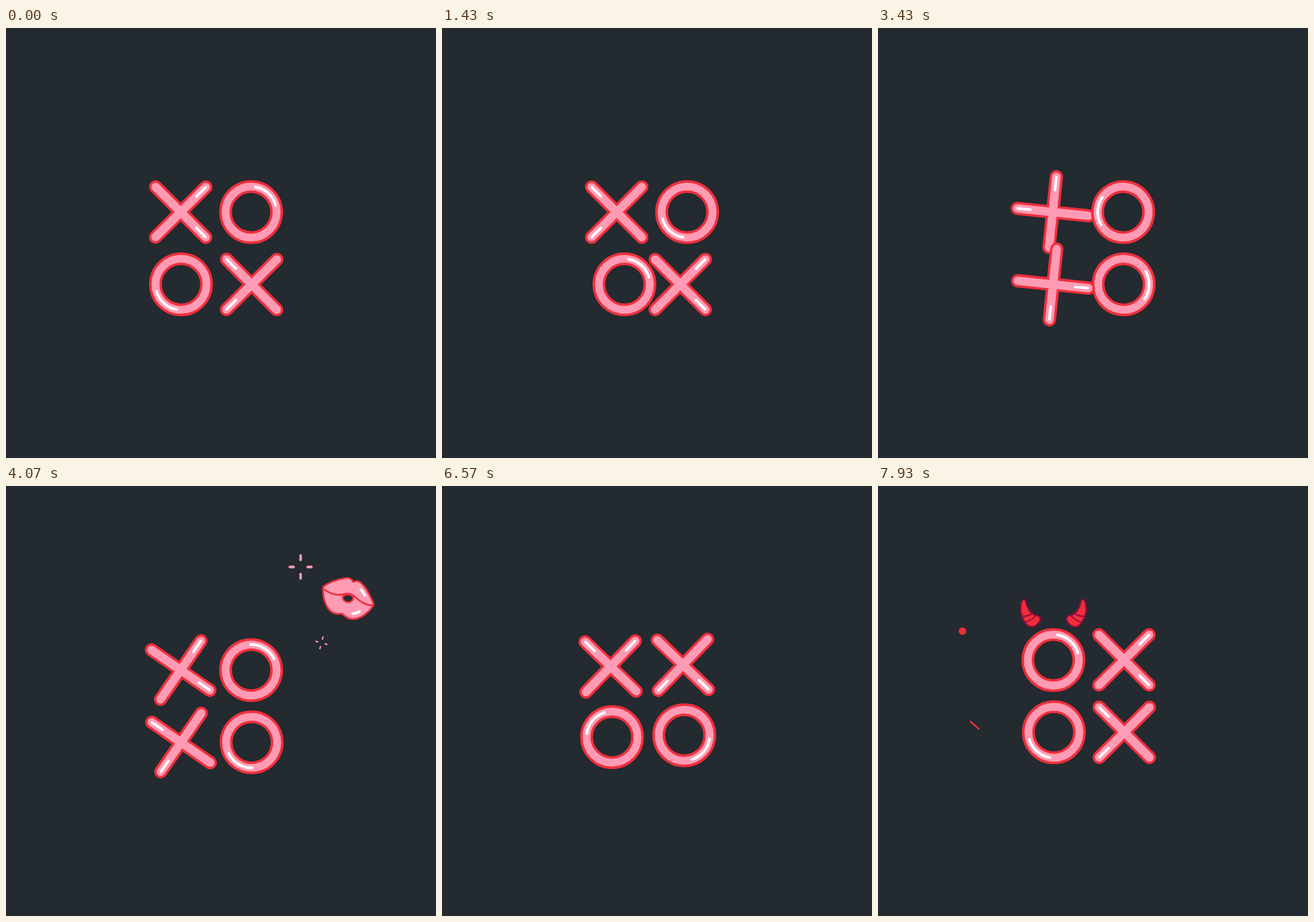
Animation, 640 px wide and 640 px high, one loop 8 s. Source, as an HTML page with a canvas:

```html
<!DOCTYPE html>
<html lang="en">
<head>
<meta charset="utf-8">
<title>XOXO</title>
<style>
html, body { margin: 0; width: 100%; height: 100%; overflow: hidden; background: #232a30; }
canvas { display: block; width: 100vmin; height: 100vmin; }
</style>
</head>
<body>
<canvas id="stage" width="640" height="640"></canvas>
<script>
const ctx = document.getElementById('stage').getContext('2d');
const BG = '#232a30', RED = '#ef2f3b', PINK = '#ff9bb4', WINE = '#930a3c', WHITE = '#fff';
const LOOP = 8000, FPS = 14;
const PIVOT = [313.3, 320.3];

const rad = deg => deg * Math.PI / 180;
const mix = (a, b, p) => a + (b - a) * p;
function ease(t, start, end) {
  const p = Math.min(1, Math.max(0, (t - start) / (end - start)));
  return p * p * (3 - 2 * p);
}

// Eased value through [time, value] pairs
function track(t, keys) {
  let v = keys[0][1];
  for (let i = 1; i < keys.length; i++) {
    v = mix(v, keys[i][1], ease(t, keys[i - 1][0], keys[i][0]));
  }
  return v;
}

function place(x, y, angle, scale, draw) {
  if (Math.abs(scale) < 0.01) return;
  ctx.save();
  ctx.translate(x, y);
  ctx.rotate(rad(angle));
  ctx.scale(scale, scale);
  draw();
  ctx.restore();
}

function stroke(path, color, width) {
  ctx.strokeStyle = color;
  ctx.lineWidth = width;
  ctx.stroke(path);
}

const shape = d => new Path2D(d);
const ring = (r, from = 0, to = 360) => {
  const p = new Path2D();
  p.arc(0, 0, r, rad(from), rad(to));
  return p;
};

const cross = shape('M-37.4-37.4L37.4 37.4M37.4-37.4L-37.4 37.4');
const crossShine = shape('M23.5-23.5L37-37M23.5 23.5L37 37');
const circle = ring(38);
const circleShine = ring(38, -81, -16);

function drawX() {
  stroke(cross, RED, 19.8);
  stroke(cross, PINK, 12.6);
  stroke(crossShine, WHITE, 4);
}

function drawO() {
  stroke(circle, RED, 19);
  stroke(circle, PINK, 11.6);
  stroke(circleShine, WHITE, 4);
}

const lips = shape('M-37-17C-28-24-16-28-4-30C2-31 6-28 8-24C13-27 18-25 22-20' +
  'C29-13 33-3 38 8C37 12 35 16 29 21C22 27 16 31 7 31C0 31-4 27-9 23' +
  'C-15 24-22 23-27 18C-34 11-38-3-37-17Z');
const lipSeam = shape('M-37-14C-30-9-22-5-14-5C-8-5-2-8 4-6C13-3 18 10 38 11');
const mouth = shape('M-8-2C-4-7 6-7 8 0C7 4 4 6 0 6C-4 6-8 3-8-2Z');
const lipShine = shape('M19-13Q23-9 25-4M7 23Q12 23 17 20');

function drawKiss() {
  ctx.fillStyle = PINK;
  ctx.fill(lips);
  stroke(lips, RED, 2.6);
  stroke(lipSeam, RED, 2.6);
  ctx.fillStyle = BG;
  ctx.fill(mouth);
  stroke(mouth, RED, 2.6);
  stroke(lipShine, WHITE, 4);
}

const rays = shape('M0-10.5V-17M0 10.5V17M-10.5 0H-16M10.5 0H16');
const drawSparkle = () => stroke(rays, PINK, 3.8);

// Left horn, relative to its base
const horn = shape('M-18-36C-21-35-23-27-22-17C-20-7-14 2-9 4Q-4 6 1 2' +
  'Q8-4 7-9Q4-13-2-13C-9-17-13-25-15-34Q-16-37-18-36Z');
const stripes = shape('M-20-11Q-10-11-4-16M-16-2Q-5-5 1-13');

function drawHorn() {
  ctx.fillStyle = RED;
  ctx.fill(horn);
  stroke(horn, WINE, 2.2);
  stroke(stripes, WINE, 2);
}

function letters(t) {
  const turn1 = 180 * ease(t, -20, 1180);
  const swap = ease(t, 1190, 2380);
  const turn2 = 180 * ease(t, 2980, 4258);
  const turn3 = 180 * ease(t, 5978, 7174);
  const top = turn1 + turn2;
  const bottom = 180 + top;
  const left = 260.5, right = 365.6;

  ctx.save();
  ctx.translate(...PIVOT);
  ctx.rotate(rad(turn3));
  ctx.translate(-PIVOT[0], -PIVOT[1]);
  place(260, 274, top, 1, drawX);
  place(364.8, 274, top, 1, drawO);
  place(mix(left, right, swap), 381.5, bottom, 1, drawO);
  place(mix(right, left, swap), 381.7, bottom, 1, drawX);
  ctx.restore();
}

function kiss(t) {
  const size = track(t, [[3760, 0], [4180, 1.2], [4430, 1.07], [4860, 1.07], [5390, 0]]);
  const spark1 = track(t, [[3690, 0], [3960, 1.05], [4100, 1], [4600, 1.05], [4960, 0]]);
  const spark2 = track(t, [[3960, 0], [4180, 1.05], [4850, 1], [5350, 0]]);
  place(509, 167, 0, size, drawKiss);
  place(438.5, 120.5, 0, spark1, drawSparkle);
  place(469.5, 233.5 + 21 * ease(t, 4070, 4850), 15, spark2, drawSparkle);
}

function devil(t) {
  const u = (t - 7200) / 1000;
  if (u <= 0) return;
  const size = 1 - Math.exp(-6.5 * u) * Math.cos(10.5 * u);
  place(234.5, 205, 0, size, drawHorn);
  ctx.save();
  ctx.translate(522, 0);
  ctx.scale(-1, 1);
  place(234.5, 205, 0, size, drawHorn);
  ctx.restore();

  const out = ease(t, 7560, 8000);
  if (out > 0) {
    ctx.fillStyle = RED;
    ctx.beginPath();
    ctx.arc(mix(148, 124, out), 216, 5.6 * ease(t, 7560, 7740), 0, 7);
    ctx.fill();
  }

  // Streak: its tail catches up with its head
  const head = ease(t, 7600, 7900), tail = ease(t, 7680, 8010);
  if (head > tail) {
    const x = p => mix(180, 137.5, p), y = p => mix(388, 350.5, p);
    const line = new Path2D();
    line.moveTo(x(tail * 0.83), y(tail * 0.83));
    line.lineTo(x(head), y(head));
    stroke(line, RED, 2.4);
  }
}

function draw(t) {
  ctx.fillStyle = BG;
  ctx.fillRect(0, 0, 640, 640);
  ctx.lineCap = ctx.lineJoin = 'round';
  letters(t);
  kiss(t);
  devil(t);
}

const start = performance.now();
function tick() {
  const t = (performance.now() - start) % LOOP;
  // Stepped motion, 14 poses per second
  draw(Math.floor((t + 4) * FPS / 1000) % (LOOP * FPS / 1000) * 1000 / FPS);
  requestAnimationFrame(tick);
}
tick();
</script>
</body>
</html>
```
